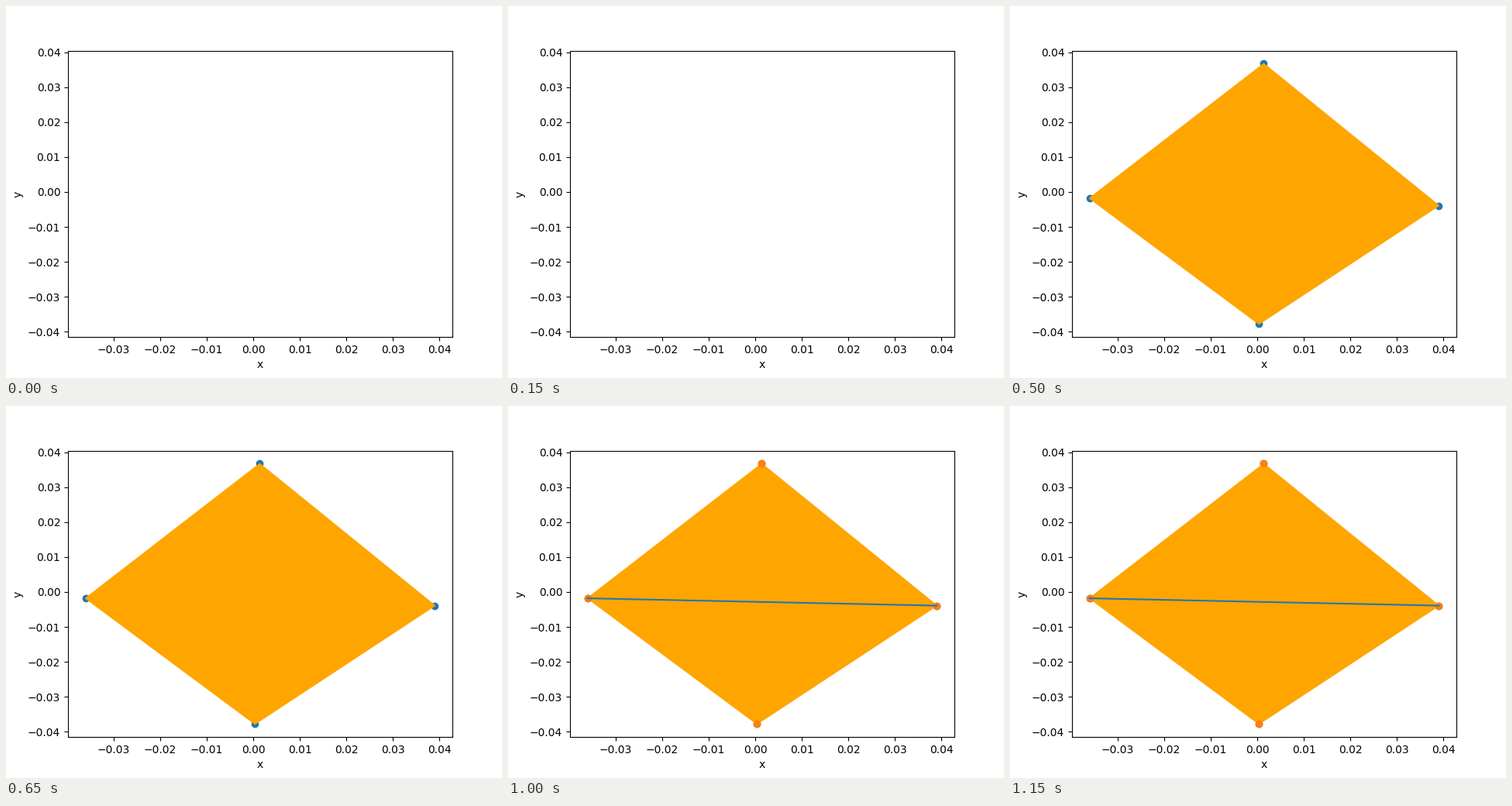
Recreate the animation shown at these times as a matplotlib script. Size 640 by 480 pixels, loop 1250 ms.

```python
import matplotlib.pyplot as plt
from matplotlib.animation import FuncAnimation

# Corners in order: left, top, right, bottom
xs = [-0.036, 0.0014, 0.039, 0.00037]
ys = [-0.0018, 0.0367, -0.0039, -0.03777]


def padded(values, margin=0.05):
    lo, hi = min(values), max(values)
    pad = margin * (hi - lo)
    return lo - pad, hi + pad


fig, ax = plt.subplots(figsize=(6.4, 4.8), dpi=100)
ax.set(xlabel="x", ylabel="y", xlim=padded(xs), ylim=padded(ys))

# Each step adds one layer on top of the previous ones
layers = [
    ax.scatter(xs, ys, color="C0"),
    ax.fill(xs, ys, color="orange")[0],
    ax.scatter(xs, ys, color="C1"),
    ax.plot(xs[::2], ys[::2], color="C0")[0],
]


def update(step):
    for i, layer in enumerate(layers):
        layer.set_visible(i < step)
    return layers


anim = FuncAnimation(fig, update, frames=len(layers) + 1, interval=250,
                     repeat=True, repeat_delay=0)
plt.show()
```
